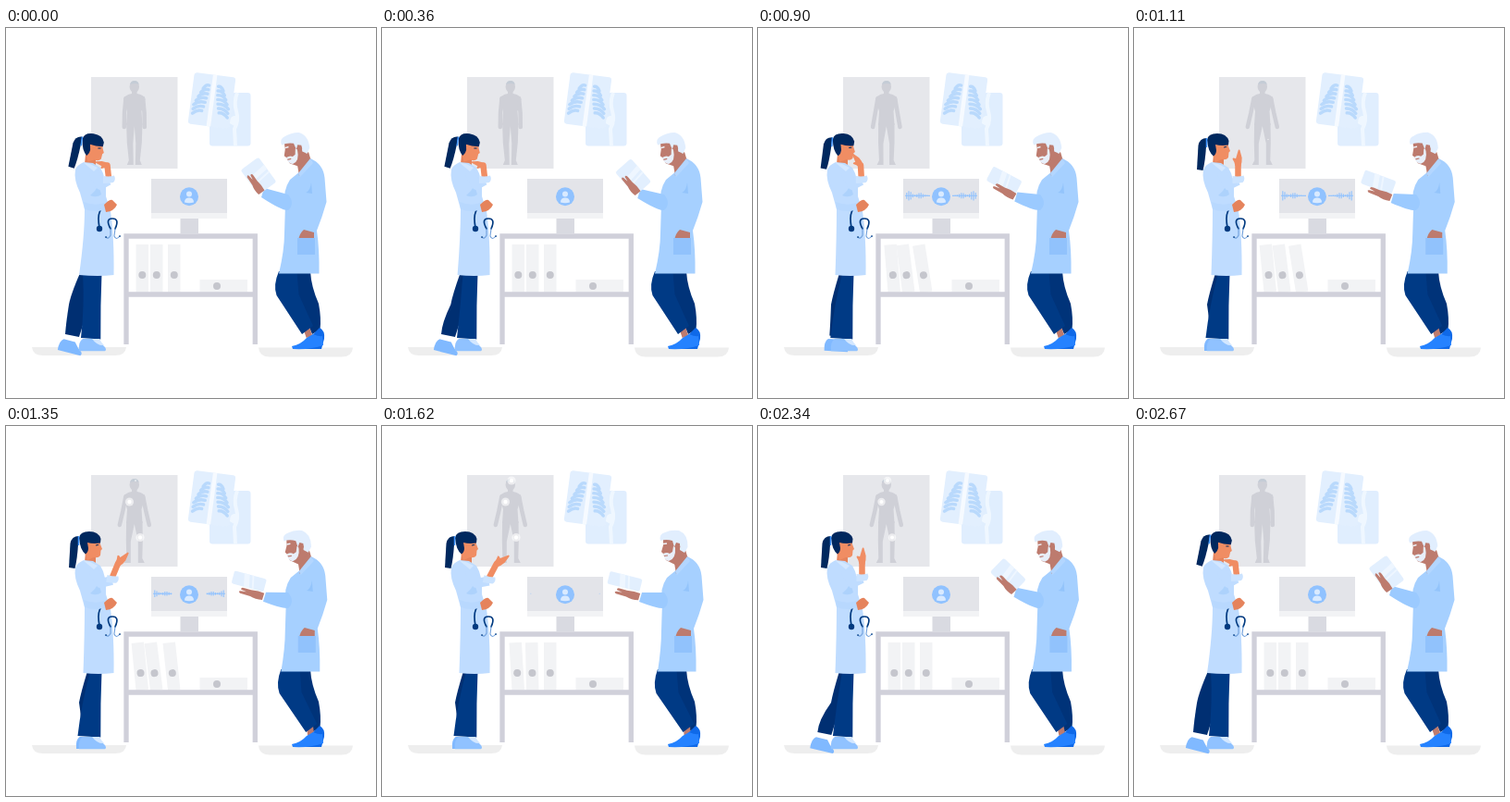
An HTML page for the animation above (2.7 s loop, 400 px wide and 400 px high).

```html
<!DOCTYPE html>
<html lang="en">
<head>
<meta charset="utf-8">
<title>Clinic</title>
<style>
html, body { margin: 0; width: 100%; height: 100%; overflow: hidden; background: #fff; }
svg { display: block; width: 100vw; height: 100vh; }
</style>
</head>
<body>
<svg viewBox="0 0 400 400">
  <!-- floor -->
  <path d="M28 345H130Q129 354 118 354H40Q29 354 28 345Z" fill="#eee"/>
  <path d="M273 345.5H375Q374 355.5 363 355.5H285Q274 355.5 273 345.5Z" fill="#eee"/>

  <!-- wall chart -->
  <path d="M92 53H185.5V152H92Z" fill="#e6e7eb"/>
  <g fill="#cfd0d7" stroke-linecap="round" stroke-linejoin="round">
    <ellipse cx="138.8" cy="63.5" rx="5.2" ry="6.5"/>
    <path d="M136 67H141.600V71Q149 72 150.500 77L146.500 90 147.500 105H130L131 90 127 77Q129 72 136 71Z"/>
    <path id="limbs" fill="none" stroke="#cfd0d7" stroke-width="4.500"/>
    <path id="legs"/>
  </g>
  <path d="M134 61Q135 57 139 57T143.700 61Q139 59 134 61Z" fill="#c4ccd6"/>
  <g id="marks"></g>

  <!-- x-rays -->
  <rect x="220" y="70" width="44.500" height="57.500" rx="3" fill="#e0eefe"/>
  <path d="M250 70Q246 80 249 90T247 109L248 127.500" fill="none" stroke="#eff7ff" stroke-width="4"/>
  <path d="M244 96Q252 92 252 100L247 106 240 102Z" fill="#eff7ff"/>
  <g transform="translate(222.500 78.500) rotate(7.500)">
    <rect x="-22.500" y="-28" width="45" height="56" rx="3" fill="#e2effe"/>
    <path d="M0-28V28" stroke="#f6faff" stroke-width="4.500"/>
    <g id="ribs" fill="none" stroke="#b9d9fc" stroke-width="3.400" stroke-linecap="round"></g>
  </g>

  <!-- monitor -->
  <path d="M188.500 205H208V222H188.500Z" fill="#d9dae1"/>
  <path d="M157 163H239V201H157Z" fill="#e3e4e9"/>
  <path d="M157 200H239V206H157Z" fill="#f2f3f5"/>
  <path id="wave" fill="none" stroke="#90c2ff" stroke-width="1.500"/>
  <circle cx="198" cy="182.300" r="10" fill="#90c2ff"/>
  <circle cx="198" cy="179.500" r="3" fill="#d9eaff"/>
  <path d="M193 188.500Q193 183.500 198 183.500T203 188.500Q198 190 193 188.500Z" fill="#d9eaff"/>

  <!-- desk -->
  <g id="binders"></g>
  <path d="M209.500 272H261V285.500H209.500Z" fill="#f2f3f5"/>
  <circle cx="228" cy="279" r="4" fill="#c5c6cd"/>
  <path d="M130 342V225H269.300V342M130 288H269" fill="none" stroke="#d0d0da" stroke-width="5.300"/>

  <!-- woman -->
  <path id="wBack" fill="#002f72"/>
  <g id="wShoe"><path d="M0 13Q-1 3 4 0H18Q23 6 28 9Q30 11 28 13Z" fill="#80b9ff"/></g>
  <path id="wFront" fill="#003a85"/>
  <g transform="translate(79 336)">
    <path d="M0 13.300Q-1 3 4 0H20Q24 6 28 9Q30 12 28 13.300Z" fill="#90c2ff"/>
    <path d="M14 0H22Q24 4 27 7Q20 8 14 0Z" fill="#d3e7ff"/>
  </g>
  <path d="M86 136H97V149L90 153 85 147Z" fill="#e5835c"/>
  <path id="wCoat" fill="#bfdcff"/>
  <path d="M83 145L91 147 99 151 95 155Z" fill="#d3e7ff"/>
  <path d="M91 181Q97 176 100 170L103 180Q98 184 91 181Z" fill="#add2fc"/>
  <g id="wHead">
    <path d="M84 123H101L102 128 104 133 102.500 134.500 102 140Q100 143 95 142L88 145 85 137Z" fill="#f08d63"/>
    <path d="M97 129L100 128.500" stroke="#00285e"/>
    <path d="M79 121Q80 114 90 114T102.500 122L102 126.500Q94 127.500 88 126L89 132Q89 136 86 138.500Q80 134 79 121Z" fill="#00285e"/>
    <path d="M78.500 119Q71 119 69.500 127L68 153 74.500 154Q77 144 78 128Z" fill="#00285e"/>
    <path d="M78.500 119L78.500 129" stroke="#3f95ff" stroke-width="1.500"/>
  </g>
  <g fill="none" stroke="#003a80" stroke-width="1.700" stroke-linecap="round">
    <path d="M101 216C98 200 102 193 110 193"/>
    <path d="M113 217Q107 206 115 206T118 217"/>
    <path d="M113 217L113 224Q111 229 108 226M118 217L117 225Q119 230 123 225" stroke="#6f9fdb" stroke-width="1.100"/>
    <path d="M108 226h.1M123 225h.1"/>
  </g>
  <circle cx="101" cy="217" r="3.200" fill="#003a80"/>
  <path d="M84 188Q96 193 106 189L109 196Q97 200 85 196Z" fill="#b8d8fe"/>
  <path d="M106 191Q112 185 115 186L120 191Q117 198 108 199Z" fill="#e5835c"/>
  <path id="wUpper" fill="none" stroke="#bfdcff" stroke-width="10" stroke-linejoin="round"/>
  <path id="wFore" fill="none" stroke="#f08d63" stroke-width="6.500" stroke-linecap="round"/>
  <g id="wHand"><path d="M-1-3Q3-4 6-7Q8-7 7-3.500L17-2Q18-.5 16 0L9 3Q4 4-1 3Z" fill="#f08d63"/></g>
  <g id="wCuff"><path d="M-6-4Q1-3 6-4.500Q8 0 5 3Q0 4-6 4Z" fill="#cbe3ff"/></g>

  <!-- man -->
  <path id="mBack" fill="#003379"/>
  <path id="mAnkle" fill="none" stroke="#bd7b6e" stroke-width="7"/>
  <path id="mFront" fill="#003a85"/>
  <path d="M316 343Q326 338 332 331L339 324Q345 327 344 336L341 347H320Z" fill="#0f69e8"/>
  <path d="M309 344Q319 342 325 335L332 331Q339 334 342 333L343 343Q330 348 310 347Z" fill="#2582ff"/>
  <g id="mBody">
    <path id="mCoat" fill="#a6d0ff"/>
    <path d="M314 142L327 134 330 144 317 160Z" fill="#bd7b6e"/>
    <path d="M329 141L332 146 318 161 316 157Z" fill="#b3d6ff"/>
    <path d="M324 178Q329 176 330 167L331 179Z" fill="#93c4fb"/>
    <path d="M316 230Q317 222 322 218L333 221 333 227Z" fill="#bd7b6e"/>
    <path d="M315 227H334V245H315Z" fill="#91c2fc"/>
  </g>
  <g id="mHead">
    <path d="M304 121H324L326 138 317 150 307 145 304 138 302 136 304 129Z" fill="#bd7b6e"/>
    <path d="M304 138Q308 136 311 138L314 136 315 130 317 131Q318 144 310 146Q305 145 304 138Z" fill="#e8effa"/>
    <path d="M305 140.500L309 140" stroke="#bd7b6e" stroke-width="1.200"/>
    <path d="M304 127.500L308 127" stroke="#f0f5fc" stroke-width="1.500"/>
    <path d="M301 124Q299 117 306 115Q312 112 321 113Q331 117 330.500 131L327 137 322 134 322 127 318 126 316 131 314 124Q307 122 301 124Z" fill="#e1eefe"/>
    <circle cx="319.500" cy="130.500" r="2.800" fill="#bd7b6e"/>
  </g>
  <path id="mSleeve" fill="#9bcaff"/>
  <g id="paper">
    <rect x="-18" y="-10" width="36" height="20" rx="2.500" fill="#e2effe"/>
    <path d="M-7-10H-1L2 10H-4ZM2-10H4L7 10H5Z" fill="#eef6ff"/>
  </g>
  <g id="mHand"><path d="M0-4Q7-6 13-4L24-4Q27-2 24-1L18 0 24 1Q25 4 21 4H14Q6 6 0 5Z" fill="#bd7b6e"/></g>
</svg>
<script>
const LOOP = 2700;
const el = id => document.getElementById(id);
const draw = (id, d) => el(id).setAttribute("d", d);
const place = (id, x, y, turn = 0, sx = 1, sy = 1) =>
  el(id).setAttribute("transform", `translate(${x} ${y}) rotate(${turn}) scale(${sx} ${sy})`);
const spin = (id, a, x, y) => el(id).setAttribute("transform", `rotate(${a} ${x} ${y})`);
const clamp = v => Math.max(0, Math.min(1, v));
const mix = (a, b, p) => a + (b - a) * p;
const ramp = (t, a, b) => (1 - Math.cos(Math.PI * clamp((t - a) / (b - a)))) / 2;
// Goes 0 to 1 during a..b and back to 0 during c..d
const swing = (t, a, b, c, d) => ramp(t, a, b) - ramp(t, c, d);

const marks = [[145, 120.5], [133.5, 82], [140, 59]];
el("marks").innerHTML = marks.map((m, i) =>
  `<g id="mark${i}" fill="#fff"><circle r="4.6" opacity=".6"/><circle r="2.2"/></g>`).join("");

let ribs = "";
for (let i = 0; i < 7; i++) {
  const y = -15 + i * 4.7, end = Math.min(19, 11 + i * 2), start = 5 + i * i * 0.12;
  for (const s of [-1, 1])
    ribs += `<path d="M${s * start} ${y - 1}Q${s * end * 0.75} ${y - 2} ${s * end} ${y + 3}"/>`;
}
el("ribs").innerHTML = ribs;

const shelf = [140.5, 156, 175];
el("binders").innerHTML = shelf.map((x, i) =>
  `<g id="binder${i}"><path d="M${x} 234h13.500v51.500h-13.500Z" fill="#f2f3f5"/><circle cx="${x + 6.8}" cy="267" r="4" fill="#c5c6cd"/></g>`).join("");

function chart(t) {
  const open = swing(t, 560, 1080, 2360, 2640);
  let arms = "", legs = "";
  for (const s of [-1, 1]) {
    const x = (shut, wide = shut) => 138.8 + s * mix(shut, wide, open);
    arms += `M${x(9.3)} 76L${x(10.8, 12.5)} 92 ${x(11, 16)} 107`;
    legs += `M${x(8.7)} 103L${x(8, 9)} 124 ${x(6, 8.5)} 143 ${x(8, 11)} 148H${x(1, 4)}L${x(1.5, 4)} 125 ${x(0)} 106 ${x(0)} 103Z`;
  }
  draw("limbs", arms);
  draw("legs", legs);
  marks.forEach(([x, y], i) => {
    const start = 1070 + 115 * i, s = swing(t, start, start + 170, 2300, 2520);
    place("mark" + i, x, y, 0, s, s);
  });
}

// Sound pulses run outwards from the avatar, mirrored
function wave(t) {
  const far = 27 * ramp(t, 380, 640), near = 25 * ramp(t, 1180, 1680);
  const lead = 10 + 15 * clamp((t - 360) / 640), late = lead - 12;
  const bump = (d, c) => Math.exp(-(((d - c) / 3.6) ** 2));
  const fade = 1 - ramp(t, 1200, 1600);
  let d = "";
  for (const s of [-1, 1]) {
    const x = v => 198 + s * (12 + v);
    if (t > 800 && t < 1560) d += `M${x(near)} 181.3H${x(far)}`;
    for (let v = 1; v < 27; v += 2.2) {
      if (v < near || v > far) continue;
      const h = 1.3 + fade * (9 * bump(v, lead) + 5 * bump(v, late));
      d += `M${x(v)} ${181.3 - h / 2}v${h}`;
    }
  }
  draw("wave", d);
  el("wave").setAttribute("stroke-width", t > 800 ? 1.1 : 1.5);
  el("wave").setAttribute("opacity", 1 - ramp(t, 1450, 1750));
}

function binders(t) {
  shelf.forEach((x, i) => {
    const up = 680 - 165 * i, down = 1450 - 125 * i;
    spin("binder" + i, -(5.5 + 1.7 * i) * swing(t, up, up + 300, down, down + 400), x + 6.8, 285.5);
  });
}

function woman(t) {
  const straight = swing(t, 0, 660, 2340, 2690);
  const step = swing(t, 500, 1080, 1750, 2400);
  const lift = swing(t, 700, 1100, 2360, 2650);
  const point = swing(t, 1110, 1470, 2040, 2340);

  const foot = mix(58, 75, step), floor = mix(333, 335, step);
  const knee = mix(68, 79, straight), top = mix(80, 88, straight), hem = mix(79, 83.5, straight);
  draw("wBack", `M${top} 265Q${knee + 2} 288 ${knee} 299Q${foot + 7} 318 ${foot + 6} ${floor - 2}L${foot + 21} ${floor + 1}L101 265Z`);
  place("wShoe", foot + 1, mix(336, 333.5, 1 - step) + 2 * (1 - step), 14 * (1 - step), 0.9);
  const cuff = mix(81, 77.5, step);
  draw("wFront", `M${top + 3} 265Q${cuff + 4} 300 ${cuff} 335L102.300 336.500Q102 300 103.500 265Z`);
  draw("wCoat", `M84 145Q77 148 75 153Q73 164 80 178L85 196Q85 225 ${hem} 267Q100 269 116.500 267Q117 225 113 198L108 182Q109 162 102 151L94 146Z`);
  spin("wHead", 8 * (1 - lift), 91, 147);

  const ex = 111 + 1.5 * lift + 3 * point, ey = 164 + 2.5 * point;
  const wx = mix(109.5, 112.5, lift) + 11 * point, wy = 148.5 + point;
  draw("wUpper", `M94 156L102 170 ${ex} ${ey + 1}`);
  draw("wFore", `M${ex} ${ey - 2}L${wx} ${wy}`);
  const size = 0.78 + 0.2 * lift;
  place("wHand", wx, wy, -160 + 78 * lift + 52 * point, size, size);
  place("wCuff", ex, ey, 13 * point);
}

function man(t) {
  const show = swing(t, 0, 1500, 1620, 2700);
  const nod = swing(t, 900, 1560, 1980, 2640);

  const knee = 290.5 + 4 * nod, ankle = 321 + 5.5 * nod, hem = 295 + 3 * nod;
  draw("mBack", `M308 263H329Q330 280 338 298Q341 314 339.500 326L331 331 318 300Z`);
  draw("mFront", `M${hem} 263Q${knee - 2} 278 ${knee + 2} 289L${ankle - 1} 331L${ankle + 11} 322L${knee + 26} 288 ${knee + 24} 263Z`);
  draw("mAnkle", `M${ankle + 3} 322L${mix(328, 330, nod)} 334`);
  place("mBody", nod, 0);
  draw("mCoat", `M318 155L329 141Q343 147 344.500 162L346.500 188Q342 204 336 219Q339 240 338.500 265.500H${hem - nod}Q301 240 301 222L302 190Q299 176 307 164Z`);
  spin("mHead", -8 * (1 - nod), 318, 146);

  const wx = mix(277, 279, show), wy = mix(178, 185, show);
  draw("mSleeve", `M${wx + 2} ${wy - 5}L305 180Q313 190 305 197Q299 198 ${wx - 1} ${wy + 5}Z`);
  place("paper", mix(273, 262.5, show), mix(160, 168, show), mix(54, 14, show),
    mix(0.92, 1, show), mix(1.2, 0.7, show));
  place("mHand", wx - 1, wy, mix(-124, -164, show), mix(0.93, 1.05, show), 0.85);
}

function frame() {
  const t = performance.now() % LOOP;
  for (const part of [chart, wave, binders, woman, man]) part(t);
  requestAnimationFrame(frame);
}
frame();
</script>
</body>
</html>
```
